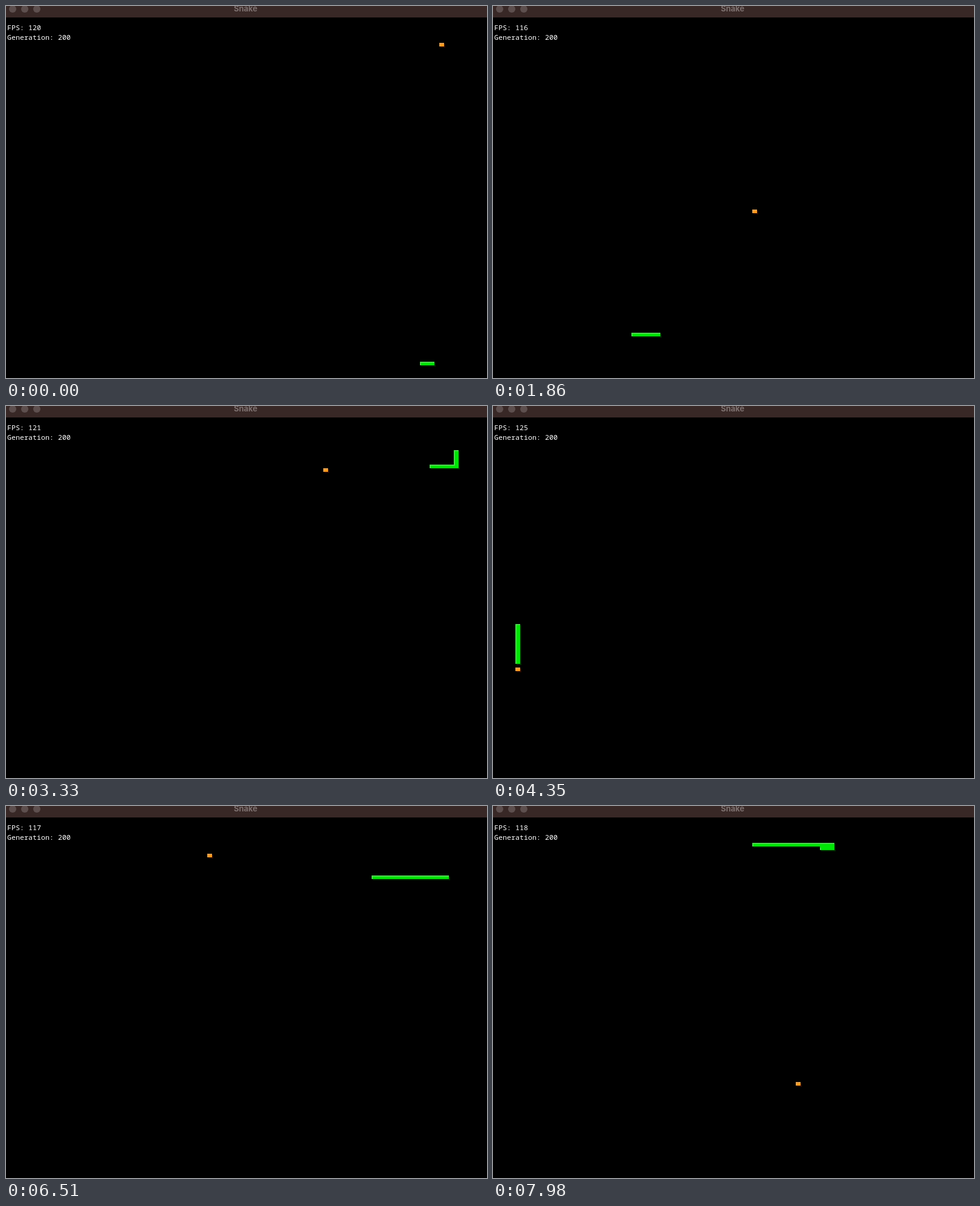
An HTML page with a canvas for the animation above (8 s loop, 796x616 px).

```html
<!DOCTYPE html>
<html lang="en">
<head>
<meta charset="utf-8">
<title>Snake</title>
<style>
  html, body { margin: 0; width: 100%; height: 100%; overflow: hidden; background: #000; }
  canvas { display: block; }
</style>
</head>
<body>
<canvas id="stage" width="796" height="616"></canvas>
<script>
const ctx = document.getElementById('stage').getContext('2d');
const LOOP = 8000, TICK = 30, LAST_TICK = 266;
const CELLS_PER_TICK = 4.004, START_LENGTH = 3;
const CELL_W = 8, CELL_H = 6, LEFT = 5, TOP = 1;

const GREEN = { body: '#00e606', lit: '#4fd450', fringe: '#002d00' };
const ORANGE = { body: '#ff9b1c', lit: '#e09f50', fringe: '#2a0800' };

// Food in the order it is eaten, as [column, row].
const foods = [
  [89, 10], [83, 50], [22, 90], [53, 56], [61, 24], [40, 8],
  [92, 16], [65, 17], [4, 72], [62, 52], [37, 70], [15, 42],
  [91, 19], [41, 13], [1, 34], [27, 10], [69, 10], [62, 76]
];

// Frame rate at evenly spaced moments of the loop.
const rates = [120, 116, 116, 121, 126, 119, 116, 118];

// The snake lines up with the food's column first, then its row;
// if that would mean reversing, it sidesteps one row.
function buildTrail() {
  const trail = [[85, 98], [86, 98], [87, 98]];
  const eatenAt = [];
  let [x, y] = trail[2], heading = 1;
  const move = (dx, dy) => {
    x += dx;
    y += dy;
    heading = dx;
    trail.push([x, y]);
  };
  for (const [fx, fy] of foods) {
    const side = Math.sign(fx - x);
    if (side && side === -heading) move(0, Math.sign(fy - y) || 1);
    while (x !== fx) move(Math.sign(fx - x), 0);
    while (y !== fy) move(0, Math.sign(fy - y));
    eatenAt.push(trail.length - START_LENGTH);
  }
  return { trail, eatenAt };
}
const { trail, eatenAt } = buildTrail();

function frameRate(tick) {
  const pos = tick / LAST_TICK * (rates.length - 1);
  const i = Math.min(Math.floor(pos), rates.length - 2);
  return Math.round(rates[i] + (rates[i + 1] - rates[i]) * (pos - i));
}

function drawWindow(fps) {
  ctx.fillStyle = '#000';
  ctx.fillRect(0, 0, 796, 616);
  ctx.fillStyle = '#382826';
  ctx.fillRect(0, 0, 796, 19);
  ctx.fillStyle = '#5d4f4e';
  for (const x of [11, 31, 51]) {
    ctx.beginPath();
    ctx.arc(x, 5, 6, 0, Math.PI * 2);
    ctx.fill();
  }
  ctx.fillStyle = '#7d706f';
  ctx.font = '700 13px Inter, sans-serif';
  ctx.textAlign = 'center';
  ctx.fillText('Snake', 396.5, 9);

  ctx.fillStyle = '#fff';
  ctx.font = '11.67px "Noto Sans Mono", monospace';
  ctx.textAlign = 'left';
  ctx.fillText('FPS: ' + fps, 2, 40);
  ctx.fillText('Generation: 200', 2, 56);
}

// Pale edge at the top and left, dark fringe at the bottom and right.
function drawCells(cells, { body, lit, fringe }) {
  const shape = new Path2D();
  for (const [col, row] of cells) {
    shape.rect(LEFT + col * CELL_W, TOP + row * CELL_H, CELL_W, CELL_H);
  }
  const fill = (color, shift) => {
    ctx.save();
    ctx.translate(shift, shift);
    ctx.fillStyle = color;
    ctx.fill(shape);
    ctx.restore();
  };
  fill(fringe, 2);
  fill(lit, 0);
  ctx.save();
  ctx.clip(shape);
  fill(body, 2);
  ctx.restore();
}

function draw(time) {
  const tick = Math.floor(time / TICK);
  const steps = Math.round(tick * CELLS_PER_TICK);
  const eaten = eatenAt.filter(s => s <= steps).length;
  const end = steps + START_LENGTH;
  drawWindow(frameRate(tick));
  drawCells([foods[eaten]], ORANGE);
  drawCells(trail.slice(end - START_LENGTH - eaten, end), GREEN);
}

function frame() {
  draw(performance.now() % LOOP);
  requestAnimationFrame(frame);
}
frame();
</script>
</body>
</html>
```
